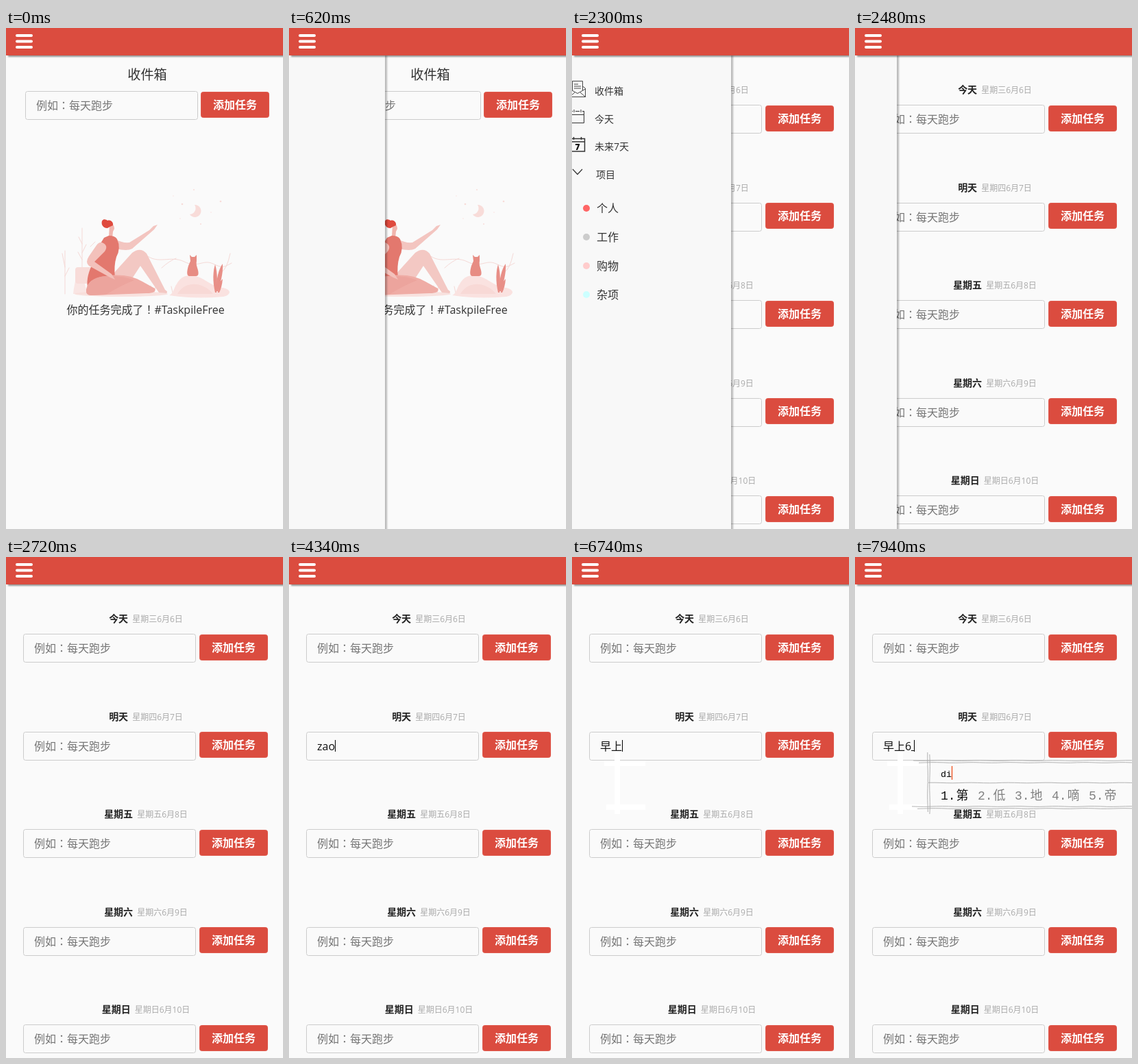
An HTML page for the animation above (8000 ms loop, 404 px wide and 731 px high).

```html
<!DOCTYPE html>
<html lang="zh-CN">
<head>
<meta charset="utf-8">
<title>收件箱</title>
<style>
  html, body { margin: 0; width: 100%; height: 100%; overflow: hidden; background: #fafafa; }
  svg { display: block; font-family: "Open Sans", "Noto Sans CJK SC", "Noto Sans CJK", sans-serif; }
  text { white-space: pre; }
  .mid { font-family: "Noto Sans CJK TC", "Noto Sans CJK", sans-serif; }
  .mono { font-family: "Liberation Mono", monospace; }
  .bar { filter: drop-shadow(3px 2px 1px rgba(0, 0, 0, .42)); }
  .panel { filter: drop-shadow(3px 0 1px rgba(0, 0, 0, .25)); }
</style>
</head>
<body>
<svg id="stage" width="404" height="731" viewBox="0 0 404 731">
  <rect width="404" height="731" fill="#fafafa"/>

  <g id="inbox">
    <g id="inboxForm"></g>
    <g id="picture" fill="none" stroke-linecap="round" stroke-linejoin="round">
      <g stroke="#f5d9d6" stroke-width="1">
        <path d="M86 388V325M86 349L82 329M86 362L92 350M111 350V292M111 315L106 305M111 328L117 316M111 338L105 327"/>
        <path d="M130 312L123 319M128 377L123 389M214 386L211 376M216 386L219 374M243 386L241 377M245 386L248 376"/>
        <path d="M204 331C222 346 240 331 260 341S287 337 302 344S317 349 329 343M227 350Q238 340 248 336M314 356Q322 353 327 329"/>
      </g>
      <g fill="#f8dcd9">
        <path d="M275 258A9 9 0 1 1 268 272A9 9 0 0 0 275 258Z"/>
        <circle cx="274" cy="236" r="1"/><circle cx="257" cy="257" r="1.3"/>
        <circle cx="313" cy="253" r="1.3"/><circle cx="284" cy="286" r="1"/>
        <circle cx="244" cy="245" r=".7"/><circle cx="299" cy="269" r=".7"/>
        <circle cx="254" cy="278" r=".7"/>
        <rect x="101" y="349" width="57" height="24" rx="4"/>
        <path d="M98 388Q101 360 109 353L119 388Z" opacity=".7"/>
        <ellipse cx="168" cy="388" rx="68" ry="4" opacity=".8"/>
        <path d="M238 390C247 388 246 360 270 361C288 362 296 376 316 379C331 382 327 390 317 392Q276 396 238 390Z" fill="#fae2e0"/>
        <path d="M250 388C263 366 290 372 302 388Z" fill="#f8d9d6"/>
      </g>
      <path d="M150 304L151 287Q158 285 158 293L156 297L155 307Z" fill="#f1b5ae"/>
      <path d="M140 287C138 278 145 278 148 281C153 279 157 284 156 288Q151 290 148 292Q142 292 140 287Z" fill="#df4a3e"/>
      <path d="M161 309Q170 314 180 313L209 295L215 289L221 287L216 294L184 322Q177 326 160 322Z" fill="#f3c5c0"/>
      <path d="M146 370L184 328Q196 319 205 329L232 382Q237 385 234 387L223 386L196 347L181 370L156 384Z" fill="#f3c8c3"/>
      <path d="M143 306L150 303Q159 303 162 308Q168 321 161 334Q157 347 159 365L157 382L121 386Q115 371 123 351Q133 330 135 319Z" fill="#e3786e"/>
      <path d="M117 382Q119 365 145 362Q176 357 199 370L217 380Q220 387 205 387L126 390Q116 391 117 382Z" fill="#efaca5"/>
      <path d="M117 382Q123 362 148 362Q171 361 187 368Q165 377 146 389L124 390Q116 389 117 382Z" fill="#eca49d"/>
      <path d="M140 313Q150 317 144 326L129 341L154 359L159 367L152 364L121 347Q115 342 121 333L132 317Q136 312 140 313Z" fill="#f3c1bb"/>
      <path d="M268 331L271 334H275L278 331L278 340Q277 344 279 350Q283 362 277 362H267Q262 361 266 347L269 340Z" fill="#e78c83"/>
      <g fill="#e88f87">
        <path d="M305 386C301 369 302 354 305 345C309 358 308 373 307 386Z"/>
        <path d="M307 384C306 366 311 350 316 344C317 360 312 373 309 384Z"/>
        <path d="M309 386Q309 372 316 366Q315 378 311 386Z"/>
      </g>
    </g>
  </g>

  <g id="week">
    <g id="rows"></g>
    <text id="typed" x="41" y="282" font-size="16" fill="#111"></text>
    <path id="caret" stroke="#000"/>
    <path id="smudge" stroke="#fff" stroke-width="8" fill="none" d="M66 285V375M47 301H107M50 365H107"/>
    <g id="ime">
      <rect x="66" y="298" width="400" height="69" fill="#fafafa"/>
      <path id="sketch" fill="none" stroke="#aaa" stroke-width=".9"/>
      <text id="pinyin" class="mono" x="84" y="321" font-size="13.33"></text>
      <path id="imeCaret" stroke="#f0501e" stroke-width="1.3"/>
      <g id="choices"></g>
    </g>
  </g>

  <g id="panel" class="panel">
    <rect y="40" width="250" height="700" fill="#f8f8f8"/>
    <g fill="none" stroke="#333">
      <path d="M18.5 85L14.5 88V100.500H37.500V88L33.500 85M18.500 91V77.500H33.500V91M14.500 89L26 95.500L37.500 89M14.500 100.500L22 94M37.500 100.500L30 94M21 82H27M21 85H31M21 88H31" stroke-width=".9"/>
      <path d="M16.500 121.500V138.500H35.500V121.500M16.500 126.500H35.500M16 121.500H19M23 121.500H29M33 121.500H36M21 119V123M31 119V123"/>
      <path d="M15.500 161.500H36.500V180H15.500ZM15.500 166H36.500M20.500 159V163M31.500 159V163" stroke-width="1.5"/>
      <path d="M19 206L26 213.500L33 206" stroke-width="1.2"/>
    </g>
    <text x="26" y="178" font-size="12" font-weight="800" text-anchor="middle" fill="#111">7</text>
    <g id="menu"></g>
  </g>

  <rect class="bar" width="404" height="40" fill="#db4c3f"/>
  <path d="M16 11H37M16 19.500H37M16 28H37" stroke="#fff" stroke-width="4" stroke-linecap="round"/>
</svg>

<script>
const LOOP = 8000, STEP = 60, PHASE = 20, SLIDE = 500, PANEL_TRAVEL = 255;
const $ = id => document.getElementById(id);
const show = (id, on) => $(id).style.display = on ? '' : 'none';

// Traditional-locale glyphs put full-width punctuation in the middle of its cell.
const centred = s => s.replace(/[：！]/g, '<tspan class="mid" lang="zh-TW">$&</tspan>');
const label = (x, y, size, fill, s, extra = '') =>
  `<text x="${x}" y="${y}" font-size="${size}" fill="${fill}" ${extra}>${centred(s)}</text>`;

const button = (x, y) =>
  `<rect x="${x + .5}" y="${y + .5}" width="99" height="37" rx="3" fill="#db4c3f" stroke="#e05a4e"/>` +
  label(x + 50, y + 25, 16, '#fff', '添加任务', 'font-weight="700" text-anchor="middle"');

const field = (x, y, hintId) =>
  `<rect x="${x + .5}" y="${y + .5}" width="251" height="41" rx="3" fill="#fafafa" stroke="#ccc"/>` +
  label(x + 16, y + 27, 16, '#757575', '例如：每天跑步', `id="${hintId}"`);

$('inboxForm').innerHTML =
  label(206, 75, 19.2, '#333', '收件箱', 'text-anchor="middle"') +
  field(28, 92, 'hintInbox') + button(284, 93) +
  label(88.5, 417, 16, '#333', '你的任务完成了！#TaskpileFree');

$('rows').innerHTML = ['今天', '明天', '星期五', '星期六', '星期日'].map((day, i) => {
  const top = 112 + 142.5 * i, y = Math.round(top);
  const date = `星期${'三四五六日'[i]}6月${6 + i}日`;
  return `<text x="204" y="${y - 17}" font-size="14" font-weight="700" fill="#222" text-anchor="middle">${day}` +
    `<tspan dx="6" font-size="12" font-weight="400" fill="#aaa">${date}</tspan></text>` +
    field(25, y, 'hint' + i) + button(282, Math.floor(top + 1));
}).join('');

$('menu').innerHTML =
  ['收件箱', '今天', '未来7天', '项目'].map((s, i) =>
    label(i < 3 ? 51 : 53, Math.round(97 + 40.6 * i), 14, '#333', s)).join('') +
  [['个人', '#f66'], ['工作', '#ccc'], ['购物', '#fcc'], ['杂项', '#cff']].map(([s, colour], i) =>
    `<circle cx="39" cy="${263 + 42 * i}" r="5" fill="${colour}"/>` +
    label(54, 269 + 42 * i, 16, '#333', s)).join('');

// Wobbly pencil line for the input-method window.
function rough(x1, y1, x2, y2, seed) {
  const n = Math.ceil(Math.hypot(x2 - x1, y2 - y1) / 9);
  let d = '';
  for (let i = 0; i <= n; i++) {
    const wobble = Math.sin(i * 7.3 + seed) * .35;
    const x = x1 + (x2 - x1) * i / n + (x1 === x2 ? wobble : 0);
    const y = y1 + (y2 - y1) * i / n + (y1 === y2 ? wobble : 0);
    d += (i ? 'L' : 'M') + x.toFixed(1) + ' ' + y.toFixed(1);
  }
  return d;
}
$('sketch').setAttribute('d', [
  [44, 297, 460, 297], [52, 300, 460, 300], [66, 329.5, 460, 329.5],
  [42, 364, 460, 364], [50, 367, 460, 367], [65, 285, 65, 372], [68, 288, 68, 375]
].map((line, i) => rough(...line, i * 2)).join(''));

// time, committed text, caret visible, pinyin in progress, candidates
const typing = [
  [0, '', 0], [3080, '', 1], [3560, '', 0], [4040, '', 1],
  [4100, 'z', 1], [4160, 'za', 1], [4340, 'zao', 1],
  [4640, 'za', 1], [4760, 'z', 1], [4880, '', 1], [5240, '', 0], [5780, '', 1],
  [5900, '', 1, ''], [5960, '', 1, 'z', '在 再 中 这 自'],
  [6080, '', 1, 'za', '咋 杂 扎 砸 匝'], [6320, '', 1, 'zao', '早 早上 造 找 遭'],
  [6740, '早上', 1], [7220, '早上', 0], [7520, '早上6', 1],
  [7820, '早上6', 1, 'd', '的 到 都 大 对'], [7940, '早上6', 1, 'di', '第 低 地 嘀 帝']
];

function drawChoices(list) {
  let x = 84;
  $('choices').innerHTML = list.split(' ').map((word, i) => {
    const fill = i ? '#808080' : '#111';
    const html = label(x, 354, 18, fill, `${i + 1}.`, 'class="mono"') +
      label(x + 22.5, 354, 18, fill, word, 'font-weight="300"');
    x += 32.4 + 21.6 * word.length;
    return html;
  }).join('');
}

function drawTyping(t) {
  const [, text, caretOn, pinyin, choices] = typing.findLast(s => s[0] <= t);
  const composing = pinyin !== undefined;
  $('typed').textContent = text;
  show('hint1', !text && !composing);
  const end = 41 + (text ? Math.round($('typed').getComputedTextLength()) : 0);
  const x = end + (composing ? 4 : 0);
  $('caret').setAttribute('d', `M${x + .5} 267V284` + (composing ? `M${end} 282.5H${x}` : ''));
  show('caret', caretOn);
  show('smudge', t >= 6740);
  show('ime', pinyin);
  if (pinyin) {
    $('ime').setAttribute('transform', `translate(${x - 45})`);
    $('pinyin').textContent = pinyin;
    $('imeCaret').setAttribute('d', `M${84.5 + 8 * pinyin.length} 305V325`);
    drawChoices(choices);
  }
}

// cubic-bezier(.25, .1, .25, 1)
function ease(x) {
  if (x <= 0 || x >= 1) return x <= 0 ? 0 : 1;
  const bezier = (s, a, b) => 3 * (1 - s) ** 2 * s * a + 3 * (1 - s) * s * s * b + s ** 3;
  let lo = 0, hi = 1;
  for (let i = 0; i < 24; i++) {
    const s = (lo + hi) / 2;
    if (bezier(s, .25, .25) < x) lo = s; else hi = s;
  }
  return bezier(lo, .1, 1);
}

let last;
function frame() {
  const t = Math.floor((performance.now() % LOOP - PHASE) / STEP) * STEP + PHASE;
  if (t !== last) {
    last = t;
    const open = ease((t - 455) / SLIDE) - ease((t - 2258) / SLIDE);
    show('panel', open > .005);
    $('panel').setAttribute('transform', `translate(${Math.round(PANEL_TRAVEL * (open - 1))})`);
    show('inbox', t < 1520);
    show('week', t >= 1520);
    drawTyping(Math.max(t, 0));
  }
  requestAnimationFrame(frame);
}
frame();
</script>
</body>
</html>
```
